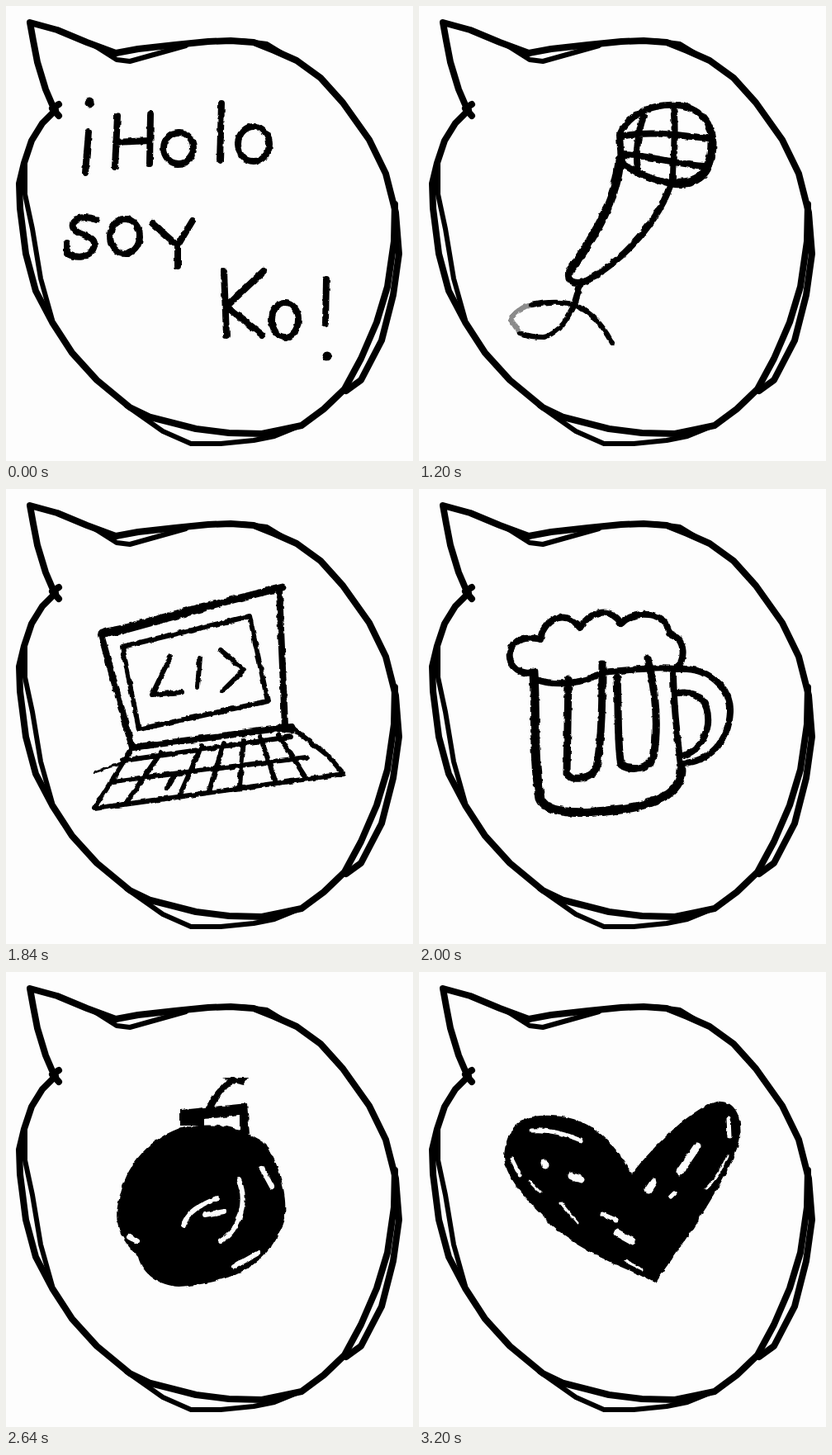
These frames come from a looping animation (493 px wide and 551 px high, 3600 ms). An HTML page:

```html
<!DOCTYPE html>
<html lang="es">
<head>
<meta charset="utf-8">
<title>¡Holo soy Ko!</title>
<style>
  html, body { margin: 0; width: 100%; height: 100%; overflow: hidden; background: #fdfdfd; }
  svg { display: block; width: 100%; height: 100%; }
  .ink { fill: none; stroke: #000; stroke-width: 8; stroke-linecap: round; stroke-linejoin: round; }
  .scene { display: none; }
  .solid { fill: #000; stroke: none; }
  .gap { stroke: #fdfdfd; stroke-width: 5; }
  .fine { stroke-width: 3; }
  .thin { stroke-width: 6; }
  .wide { stroke-width: 9; }
  .bold { stroke-width: 11; }
</style>
</head>
<body>
<svg viewBox="0 0 493 551">
  <filter id="rough" filterUnits="userSpaceOnUse" width="493" height="551" color-interpolation-filters="sRGB">
    <feTurbulence type="fractalNoise" baseFrequency=".13" numOctaves="2" seed="4"/>
    <feDisplacementMap in="SourceGraphic" scale="4" xChannelSelector="R" yChannelSelector="G"/>
  </filter>

  <g class="ink">
    <!-- speech bubble: tail, main outline, second pass of the pen -->
    <path d="M64 133L56 124L64 119M60 129L48 101L38 68L33 42L29 20L62 29L98 44L133 57"/>
    <path d="M133 57L160 52L205 47L245 43L272 42L300 44L325 54L352 66L381 87L408 117L440 162L460 203L472 250L476 300L469 350L455 405L430 453L412 466"/>
    <path class="thin" d="M104 46L134 65L150 67L218 48M285 42L316 46L334 57"/>
    <path d="M60 126L44 142L31 163L22 190L16 215L17 245L24 300L36 345L56 383L80 420L110 453L150 486L175 498L230 512L270 517L310 518L358 508L385 488L410 464L430 427L449 383L462 340L470 285L471 240"/>
    <path class="thin" d="M23 190L23 228L32 270L42 330L56 380M146 484L190 515L224 530L260 530L300 526L325 521L362 506"/>

    <g class="scene" filter="url(#rough)" role="img" aria-label="¡Holo soy Ko!">
      <path d="M100 153L96 202M135 133L132 195M175 131L174 191M133 165L174 163M261 118L259 187"/>
      <ellipse cx="209" cy="172" rx="18" ry="19"/>
      <ellipse cx="300" cy="167" rx="19" ry="21"/>
      <path d="M110 259C95 253 78 257 81 268C86 280 109 276 107 290C103 306 85 306 74 300V287M177 263L203 286M226 260L208 290V315"/>
      <ellipse cx="144" cy="279" rx="18" ry="21"/>
      <path d="M264 321L267 399M312 321L267 364L310 398M388 331L387 384"/>
      <ellipse cx="338" cy="380" rx="16" ry="21"/>
      <path class="bold" d="M101 117h.1M389 424h.1"/>
    </g>

    <g class="scene" filter="url(#rough)">
      <path d="M243 156C255 127 290 116 320 121C350 129 358 150 355 180C352 205 335 218 310 216C285 212 258 200 245 190Z"/>
      <path d="M272 133C265 155 262 180 265 196M308 122C312 150 308 180 308 212M245 158C280 150 320 158 353 160M246 180C280 180 320 194 350 194M182 320C176 337 195 338 208 330C250 305 290 260 304 218M196 335L188 362"/>
      <path class="bold" d="M243 186C240 238 206 288 183 321M355 165C355 202 338 216 310 214"/>
      <path class="thin" d="M234 408C222 385 205 365 180 360C164 357 150 359 136 362M122 396Q134 401 152 401C170 395 180 380 190 357"/>
      <path class="thin" stroke-opacity=".45" stroke-dasharray="5 3" d="M136 362Q118 366 111 380L122 396"/>
    </g>

    <g class="scene" filter="url(#rough)">
      <path d="M115 176L153 313L346 288M331 123L338 287"/>
      <path class="bold" d="M117 175L142 170L240 143M334 289L346 291"/>
      <path class="wide" d="M240 143L335 119"/>
      <path class="thin" d="M141 191L295 154L317 257L161 291ZM199 203L177 249L213 246M235 204L232 239M260 195L288 219L262 245"/>
      <path class="thin" d="M153 313L107 387L409 345L390 323L348 290M142 329L345 300M130 354L364 325M187 320L147 378M237 311L210 372M264 308L246 366M288 304L283 360M308 300L326 353M330 298L362 348M205 345L195 362"/>
      <path class="fine" d="M107 343L145 330"/>
    </g>

    <g class="scene" filter="url(#rough)">
      <path d="M139 222C118 226 108 210 110 198C113 182 130 178 147 182C150 160 175 143 195 168C205 150 230 140 245 163C262 145 300 148 303 175C325 181 322 210 312 216"/>
      <path d="M140 230C165 240 203 235 222 222C260 218 290 216 312 218"/>
      <path class="bold" d="M139 222C142 280 138 330 147 375C155 395 200 393 235 389C280 385 318 370 318 340"/>
      <path d="M318 340C312 300 308 250 308 220M312 218C350 215 378 240 377 270C375 308 350 330 320 332M314 247C340 243 352 260 350 285C347 305 335 318 322 322"/>
      <path class="wide" d="M181 230L179 345C185 355 210 350 215 338C222 300 222 250 222 212M240 228C242 270 240 310 245 335C260 342 278 338 284 325C290 290 288 250 277 205"/>
    </g>

    <g class="scene" filter="url(#rough)">
      <path class="solid" d="M208 190C240 182 280 184 300 200L315 208C334 240 340 270 338 295C325 345 290 375 210 381C185 380 165 365 160 345C135 320 130 300 137 275C145 235 170 205 208 190Z"/>
      <path class="solid" d="M211 167L292 159L295 196L283 196V174L240 178V186H211Z"/>
      <path d="M247 164C254 150 264 137 274 132"/>
      <path class="solid" d="M262 128H293L288 136L274 133Z"/>
      <path class="gap thin" d="M215 308C218 290 236 282 256 274M241 294L264 290M282 252C292 275 286 310 260 326M310 238L322 260M276 357L306 340M149 321L159 326"/>
    </g>

    <g class="scene" filter="url(#rough)">
      <path class="solid" d="M213 192L342 153L352 145L357 175L362 203L300 214L245 229L232 232L216 231Z"/>
      <path class="wide" d="M224 225C232 260 228 300 220 345"/>
      <path class="solid" d="M127 358C128 335 150 315 185 312C205 312 222 320 224 335C222 365 205 395 165 398C140 396 128 375 127 358Z"/>
      <path class="gap" d="M252 198Q278 186 302 184M152 368L169 353M173 372L184 354"/>
      <path class="gap fine" d="M310 188L344 182M150 384Q165 389 182 383M200 372L212 363"/>
    </g>

    <g class="scene" filter="url(#rough)">
      <path class="solid" d="M103 225C105 190 120 172 160 174C215 175 240 215 258 244C285 210 330 165 360 157C390 153 392 190 388 205C375 250 320 330 286 376C260 362 180 335 150 295C120 265 105 245 103 225Z"/>
      <path class="gap" d="M136 192Q165 190 196 204M112 226L122 246M375 177L376 200M222 293L238 300M305 272L309 268"/>
      <path class="gap wide" d="M152 231L153 234M184 247L196 251M316 242L337 211M278 264L284 255M240 316L258 326"/>
      <path class="gap fine" d="M348 262Q364 246 374 222M172 280L192 304M134 254L146 266M250 350L270 360"/>
    </g>
  </g>
</svg>
<script>
  const scenes = document.querySelectorAll('.scene');
  const LOOP = 3600, INTRO = 1200, HOLD = 400;
  const start = performance.now();

  function draw(now) {
    const t = Math.max(0, now - start) % LOOP;
    const current = t < INTRO ? 0 : 1 + Math.floor((t - INTRO) / HOLD);
    scenes.forEach((scene, i) => scene.style.display = i === current ? 'inline' : 'none');
    requestAnimationFrame(draw);
  }
  draw(start);
</script>
</body>
</html>
```
